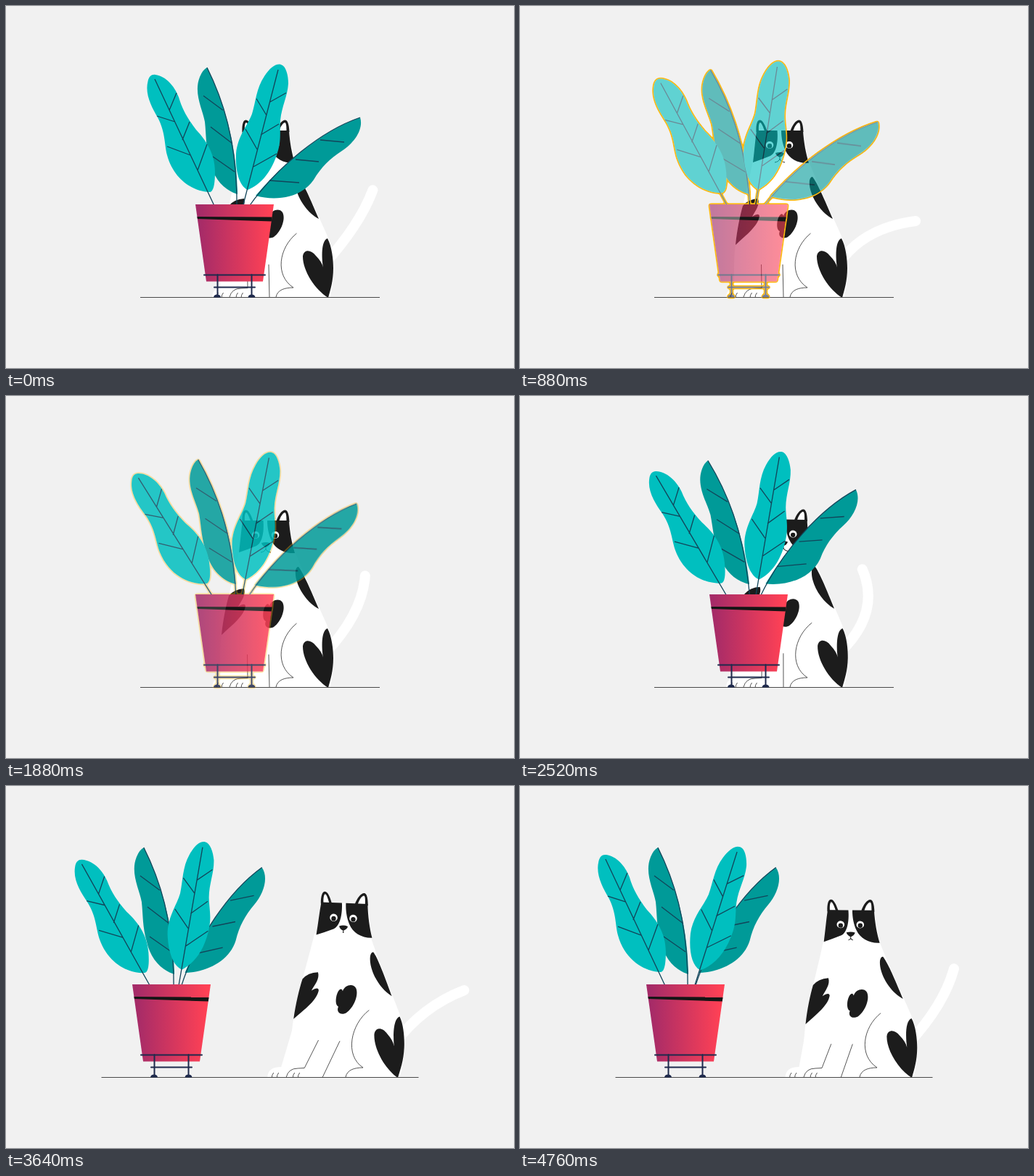
An HTML page for the animation above (4800 ms loop, 700 by 500 pixels).

```html
<!DOCTYPE html>
<html lang="en">
<head>
<meta charset="utf-8">
<title>Cat behind a plant</title>
<style>
  html, body { margin: 0; width: 100%; height: 100%; overflow: hidden; background: #f1f1f1; }
  svg { display: block; width: 700px; height: 500px; }
  .light { fill: #00bfbf; }
  .dark { fill: #009a98; }
  .vein { fill: none; stroke: #12455a; stroke-width: 1.3; }
  .stand { fill: none; stroke: #1f2a4d; stroke-width: 2; stroke-linecap: round; }
  .white { fill: #fff; }
  .black { fill: #1c1c1c; }
  .line { fill: none; stroke: #2b2b2b; stroke-width: .8; }
  .bold { stroke-width: 1; }
</style>
</head>
<body>
<svg viewBox="0 0 700 500">
  <defs>
    <linearGradient id="potFill">
      <stop offset="0.05" stop-color="#a52b68"/>
      <stop offset="0.95" stop-color="#ff4155"/>
    </linearGradient>
    <clipPath id="aboveGround"><rect x="-300" y="-100" width="1300" height="502.5"/></clipPath>
    <filter id="rim" filterUnits="userSpaceOnUse" x="120" y="40" width="420" height="400" color-interpolation-filters="sRGB">
      <feGaussianBlur in="SourceAlpha" stdDeviation="1.5"/>
      <feComponentTransfer><feFuncA type="linear" slope="8" intercept="-.5"/></feComponentTransfer>
      <feComposite in2="SourceAlpha" operator="out" result="ring"/>
      <feFlood flood-color="#fdb913"/>
      <feComposite in2="ring" operator="in"/>
    </filter>
  </defs>

  <g id="cat" clip-path="url(#aboveGround)">
    <path id="tail" fill="none" stroke="#fff" stroke-width="14" stroke-linecap="round"/>
    <path id="pawFar" class="white"/>
    <g id="body">
      <path class="white" d="M321 214C314 250 300 300 297 330C294 350 295 380 296 425H440C455 385 453 345 446 325C438 305 418 265 398 215Z"/>
      <path class="black" d="M328 266C331 275 324 283 320 291Q329 285 330 290C328 304 312 316 297 330C299 310 303 290 307 276Q314 267 328 266Z"/>
      <path class="black" d="M363 290C366 281 377 279 381 285C386 294 379 312 369 319C361 323 355 318 358 311C352 309 354 292 359 288Q362 286 363 290Z"/>
      <path class="black" d="M403 236C410 244 424 278 431 294C412 284 397 258 399 241Q400 236 403 236Z"/>
      <path class="black" d="M443 321C449 332 451 350 451 362C451 380 447 392 444 403C426 392 409 366 409 346C410 336 420 336 427 345Q435 353 437 361C435 348 434 324 443 321Z"/>
      <g id="head">
        <path class="white" d="M326 172H390L398 218L321 218Z"/>
        <path class="black" d="M325.500 174C325 163 327 157.500 330.500 157.500C334.500 157.500 338 165 341 174ZM390.500 174C390 163 388 157.500 384.500 157.500C380.500 157.500 375 164 372 174Z"/>
        <path class="white" d="M329 172.500C328.500 165 329.500 161 331 161C333 161.500 335 167 337 172.500ZM386.500 172.500C386.500 165 386 161 384 161C381.500 161.500 378 167 376.500 172.500Z"/>
        <path class="black" d="M326 172H354.500C356 188 353 203 345 207Q333 212 321 216C323 200 324 186 326 172ZM360 172H390C391 188 394 204 398 217C384 218 371 211 366 200C362 192 360 182 360 172Z"/>
        <g id="eyes">
          <ellipse class="white" cx="344" cy="0" rx="5.300" ry="5"/>
          <ellipse class="white" cx="371" cy="0" rx="5.300" ry="5"/>
          <circle class="black" cx="344" cy="1.300" r="3.200"/>
          <circle class="black" cx="371" cy="1.300" r="3.200"/>
        </g>
        <path class="black" d="M352 203Q358 201 364 203Q363 207 358 209Q353 207 352 203Z"/>
        <path class="line bold" d="M358 208V212"/>
        <path id="mouth" class="line bold"/>
      </g>
    </g>
    <path id="pawNear" class="white" d="M308 403Q311 390 324 390H350V403Z"/>
    <path id="legs" class="line"/>
  </g>

  <path id="ground" stroke="#4a4a4a" stroke-width="1"/>

  <g id="plantPos">
    <use id="rimUse" href="#plant" filter="url(#rim)"/>
    <g id="fade">
      <g id="plant">
        <g id="leafD">
          <path class="dark" d="M488 154C435 172 380 220 344 262C372 270 407 265 424 240C434 223 446 211 463 200C480 189 493 170 488 154Z"/>
          <path class="vein" d="M488 154C435 172 373 222 334 278M433 185L466 188M399 212L431 215M363 241L404 244"/>
        </g>
        <g id="leafB">
          <path class="dark" d="M277 85C297 125 318 185 319 260C300 254 286 238 281 215C275 195 276 178 274 160C271 143 258 120 267 98Q271 88 277 85Z"/>
          <path class="vein" d="M277 85C297 125 319 185 318 278M272 124L299 144M282 167L312 190M285 208L315 229"/>
        </g>
        <g id="leafA">
          <path class="light" d="M281 257C262 257 232 243 222 206C218 190 220 175 209 154C201 140 191 122 195.500 104C197 97 201 94 206 95C220 97 232 110 238 126C243 143 250 155 262 171C274 184 288 202 288 229C288 246 286 256 281 257Z"/>
          <path class="vein" d="M205 101L288 278M208 152L233 160M235 120L225 144M253 160L243 185M222 194L254 206M277 191L264 227"/>
        </g>
        <g id="leafC">
          <path class="light" d="M333 254C321 248 316 228 317 204C319 180 333 165 339 149C344 133 345 113 356 97C364 85 372 79 379 81C386 83 389 96 389 107C388 125 380 138 378 158C377 176 380 186 373 206C364 232 350 247 333 254Z"/>
          <path class="vein" d="M375 88L326 278M345 128L359 151M386 120L363 133M376 163L351 178M330 170L346 198M373 204L341 222"/>
        </g>
        <path fill="url(#potFill)" d="M261 274H369L354 380.500H276Z"/>
        <path fill="#151515" d="M263.400 291L366.600 291.500L365.700 297.500L263.900 294Z"/>
        <path class="stand" d="M273 371.500H357M287 388.500H343M291.500 371V400M338.500 371V400"/>
        <path fill="#1f2a4d" d="M286 402.500Q286.500 398.500 291 398.500Q295.500 398.500 296 402.500ZM333.500 402.500Q334 398.500 338.500 398.500Q343 398.500 343.500 402.500Z"/>
      </g>
    </g>
  </g>
</svg>

<script>
const LOOP = 4800, STEP = 40, RAD = Math.PI / 180;
const $ = id => document.getElementById(id);
const set = (id, name, value) => $(id).setAttribute(name, value);
const ramp = (t, from, to) => Math.min(1, Math.max(0, (t - from) / (to - from)));
const ease = (t, from, to) => (1 - Math.cos(Math.PI * ramp(t, from, to))) / 2;

// Rises from 0 to 1 over a..b, then settles at rest over c..d.
const bump = (t, a, b, c, d, rest = 0) => ease(t, a, b) - (1 - rest) * ease(t, c, d);

// Swings from one turning point [time, angle] to the next.
const swing = (t, turns) => turns.reduce((angle, [time, to], i) =>
  i ? angle + (to - turns[i - 1][1]) * ease(t, turns[i - 1][0], time) : to, 0);

const leaves = {
  leafA: { pivot: "295 295", turns: [[0, 0], [1800, -6.9], [3300, -3.5], [4100, -5], [4800, 0]] },
  leafB: { pivot: "317 295", turns: [[0, 0], [900, -4], [1700, -3.2], [2600, -5], [3700, 0]] },
  leafC: { pivot: "324 295", turns: [[0, 0], [560, -5.4], [1300, -6], [1950, -3.4], [3160, -6.6], [4800, 3.1]] },
  leafD: { pivot: "325 295", turns: [[0, 0], [1100, 2.4], [3600, -17]] }
};
const tailTurns = [[0, 57], [1050, 27], [2300, 75], [2850, 74], [3750, 36], [4800, 59]];

function drawPlant(t, apart) {
  const xray = ramp(t, 480, 800) - ramp(t, 1640, 2020);
  set("plantPos", "transform", `translate(${-87 * apart} 0)`);
  for (const [id, { pivot, turns }] of Object.entries(leaves))
    set(id, "transform", `rotate(${swing(t, turns)} ${pivot})`);
  set("fade", "opacity", 1 - .4 * xray);
  set("rimUse", "opacity", xray);
  set("rimUse", "display", xray ? "inline" : "none");
}

// The further the tail turns from 50 degrees, the more it curls.
function drawTail(t) {
  const angle = swing(t, tailTurns);
  const polar = (deg, r) => `${440 + r * Math.cos(deg * RAD)} ${355 - r * Math.sin(deg * RAD)}`;
  set("tail", "d", `M440 355Q${polar(angle + 1.25 * (50 - angle), 60 + .45 * (angle - 30))} ${polar(angle, 120)}`);
}

function drawCat(t, apart) {
  const lean = 2.4 * bump(t, 1900, 3200, 3640, 4800, .16);
  const stretch = 1 + .03 * bump(t, 2500, 3160, 3640, 4700);
  const stride = bump(t, 2850, 3700, 4000, 4800, .72);
  const lids = 1 - .8 * bump(t, 3000, 3140, 3200, 3340);
  const mouth = 1 - bump(t, 3240, 3600, 3960, 4760, .55);

  set("cat", "transform", `translate(${96 * apart} 0)`);
  set("body", "transform", `translate(445 402) rotate(${lean}) scale(1 ${stretch}) translate(-445 -402)`);
  set("head", "transform", `translate(${lean} 0)`);
  set("eyes", "transform", `translate(0 192) scale(1 ${lids})`);
  const dip = 211 + 4 * mouth, end = 211 + 5 * mouth;
  set("mouth", "d", `M${358 - 7 * mouth} ${end}Q357 ${dip} 358 211Q359 ${dip} ${358 + 7 * mouth} ${end}`);

  // Leg lines hang from the leaning body but stand on the ground.
  const bend = (x, y) => {
    const dx = x - 445, dy = (y - 402) * stretch, c = Math.cos(lean * RAD), s = Math.sin(lean * RAD);
    return `${445 + dx * c - dy * s} ${402 + dx * s + dy * c}`;
  };
  const far = -20 * stride, near = -18 * stride, inner = -23 * stride;
  const toe = x => `M${x} 403Q${x} 399 ${x + 2.5} 396`;
  set("pawFar", "d", `M${284 + far} 403Q${284 + far} 388 ${303 + far} 388L${bend(297, 340)}H340V403Z`);
  set("pawNear", "transform", `translate(${near} 0)`);
  set("legs", "d",
    `M${308 + near} 402Q${311 + near} 390 ${324 + near} 390L${333 + near} 389.500L${bend(332.5, 357)}`
    + toe(290 + far) + toe(297 + far) + toe(317 + near) + toe(324 + near)
    + `M${bend(362, 357)}L${363 + inner} 402`
    + `M${bend(400.5, 314)}C${bend(376, 334)} 370 372 396 389C384 389 374 392 372 402`);
}

function draw(t) {
  const apart = ease(t, 2692, 3492);
  set("ground", "d", `M${185 - 53.5 * apart} 402.500H${515 + 53.5 * apart}`);
  drawPlant(t, apart);
  drawTail(t);
  drawCat(t, apart);
}

function tick() {
  draw(Math.floor(performance.now() % LOOP / STEP) * STEP);
  requestAnimationFrame(tick);
}
tick();
</script>
</body>
</html>
```
